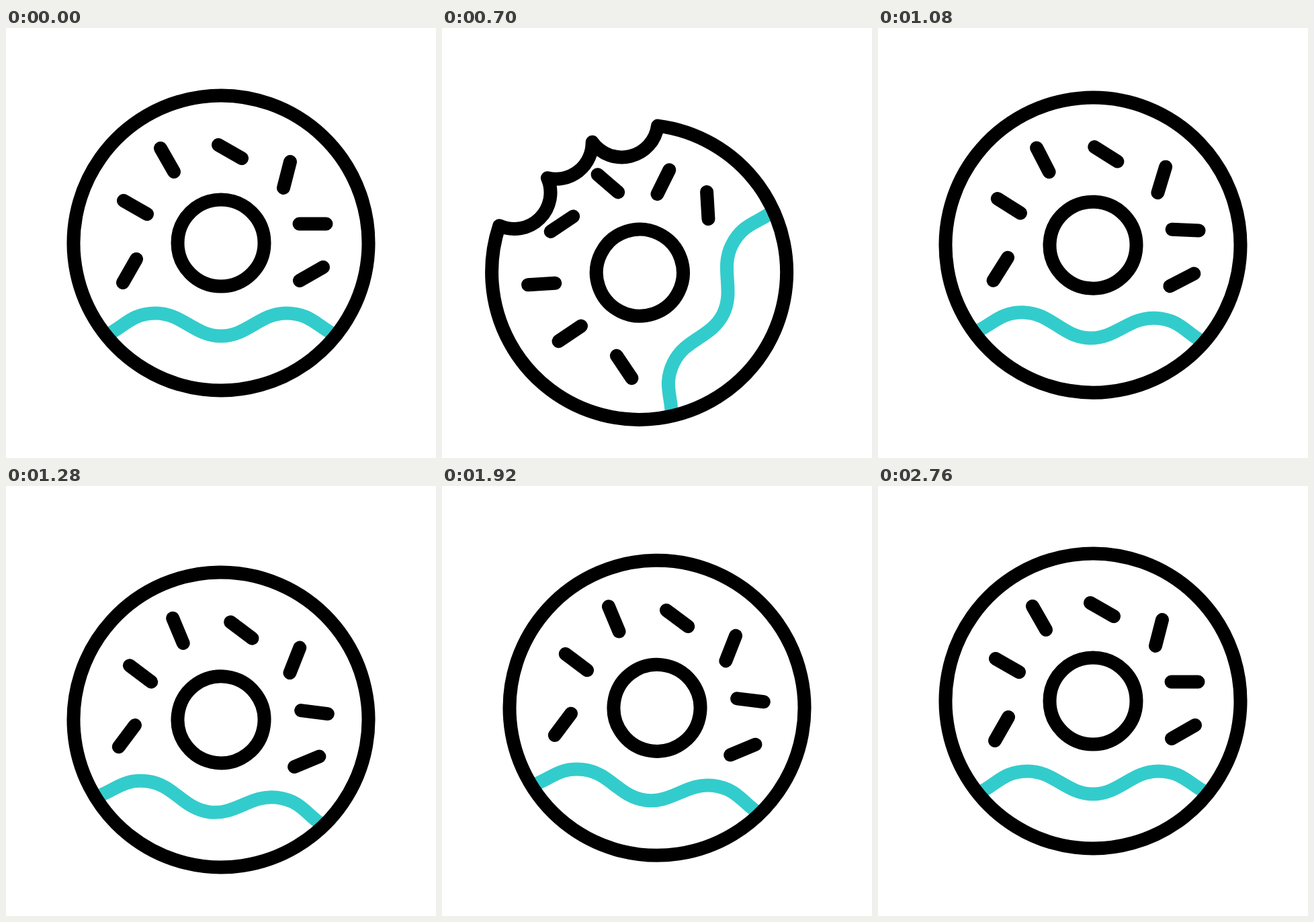
These frames come from a looping animation (640 px wide and 640 px high, 3 s). An HTML page:

```html
<!DOCTYPE html>
<html lang="en">
<head>
<meta charset="utf-8">
<title>Bitten donut</title>
<style>
  html, body { margin: 0; width: 100%; height: 100%; overflow: hidden; background: #fff; }
  svg { display: block; width: 100%; height: 100%; }
  path, circle { fill: none; stroke: #000; stroke-width: 20; stroke-linecap: round; stroke-linejoin: round; }
  .teal { stroke: #3cc; }
  #wave { stroke-linecap: butt; }
</style>
</head>
<body>
<svg viewBox="0 0 640 640">
  <g id="donut">
    <path id="wave" class="teal" d="M-170 137C-144 125-134 104.5-97 104.5C-58 104.5-39 138.5 0 138.5C39 138.5 58 104.5 97 104.5C134 104.5 144 125 170 137"/>
    <path id="ring"/>
    <circle r="64.5"/>
    <path d="M-146 59L-126 24M-145-63L-110-43M-90-141L-70-106M-4-146L31-126M103-121L93-82M116.5-28.5H156.5M117 56L152 36"/>
  </g>
  <path id="sparks" class="teal"/>
</svg>
<script>
const LOOP = 3000, RADIUS = 219.5, BITE_RADIUS = 54;
const [donut, ring, sparks] = ['donut', 'ring', 'sparks'].map(id => document.getElementById(id));

// Corners of the bite, relative to the donut's centre
const corners = [[-30.1, -218.4], [65.3, -185.7], [142.7, -149.6], [207.7, -73.1]];
const sparkLines = [[345, 96, 321, 39], [396, 101, 418, 45], [441, 133, 496, 109]];

// Tracks are [time, value] keys, eased in and out between neighbours
const recoil = [[220, 0], [310, -.125], [590, 1], [845, 0]];
const spin = [[220, 0], [310, 3], [590, -23], [1102, -360]];
const bob = [[1000, 0], [1560, 55.5], [1940, 10], [2290, 56], [2740, 0]];
const tilt = [[1000, 0], [1560, 14.2], [1940, 7], [2290, 12.4], [2740, 0]];
const bite = [[310, 0], [400, 1], [920, 1], [1080, 0]];
const sparkHead = [[376, -.3], [494, 1.3]];
const sparkTail = [[420, -.3], [564, 1.3]];

const lerp = (a, b, u) => a + (b - a) * u;

function at(keys, t) {
  const i = keys.findIndex(key => key[0] > t);
  if (i === 0) return keys[0][1];
  if (i < 0) return keys[keys.length - 1][1];
  const [t0, v0] = keys[i - 1], [t1, v1] = keys[i];
  const u = (t - t0) / (t1 - t0);
  return lerp(v0, v1, u * u * (3 - 2 * u));
}

// Bends the rim from a full circle (0) to three tooth marks (1)
function ringPath(amount) {
  const bend = lerp(1 / RADIUS, -1 / BITE_RADIUS, amount);
  const radius = Math.min(1 / Math.abs(bend), 1e5);
  const points = corners.map(([x, y]) => {
    const scale = lerp(RADIUS / Math.hypot(x, y), 1, amount);
    return `${x * scale} ${y * scale}`;
  });
  const teeth = points.slice(1).map(p => `A${radius} ${radius} 0 0 ${bend > 0 ? 1 : 0} ${p}`);
  return `M${points[0]}${teeth.join('')}A${RADIUS} ${RADIUS} 0 1 1 ${points[0]}Z`;
}

function sparkPath(tail, head) {
  if (head - tail < .01) return '';
  return sparkLines.map(([x0, y0, x1, y1]) => {
    const point = u => `${lerp(x0, x1, u)} ${lerp(y0, y1, u)}`;
    return `M${point(tail)}L${point(head)}`;
  }).join('');
}

function draw() {
  const t = performance.now() % LOOP;
  const push = at(recoil, t);
  const x = 320 - 43 * push;
  const y = 320 + 74 * push + at(bob, t);
  donut.setAttribute('transform', `translate(${x} ${y}) rotate(${at(spin, t) + at(tilt, t)})`);
  ring.setAttribute('d', ringPath(at(bite, t)));
  sparks.setAttribute('d', sparkPath(at(sparkTail, t), at(sparkHead, t)));
  requestAnimationFrame(draw);
}
draw();
</script>
</body>
</html>
```
